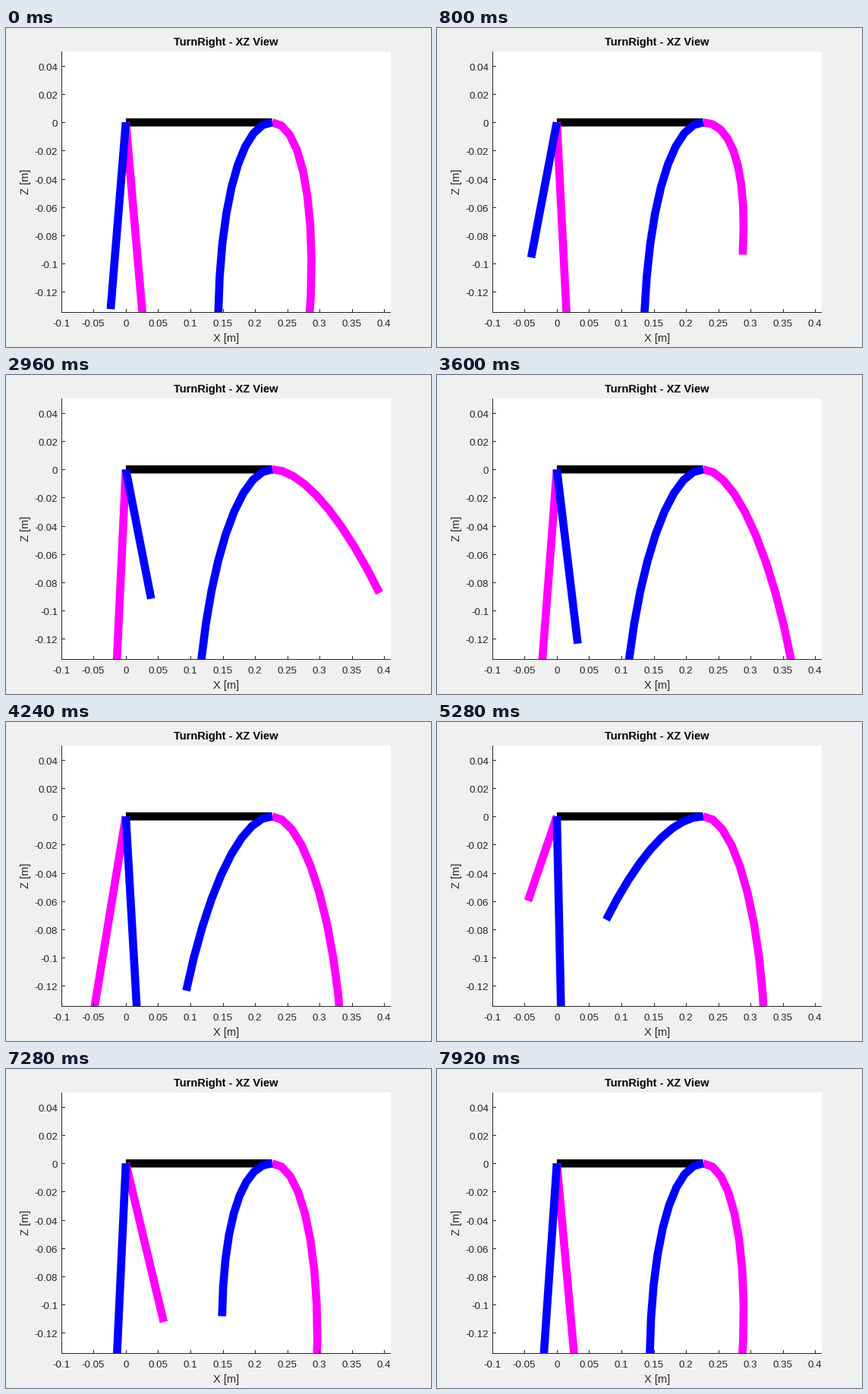
These frames come from a looping animation (560 px wide and 420 px high, 8 s). A matplotlib script:

```python
import numpy as np
import matplotlib.pyplot as plt
from matplotlib.animation import FuncAnimation
from matplotlib.lines import Line2D

W, H, DPI = 560, 420, 100
FRAMES, INTERVAL = 100, 80
HALF = FRAMES // 2
PT = 72 / DPI                      # points per pixel

INK = "#262626"
MAGENTA, BLUE = "#ff00ff", "#0000ff"
LINE_PX = 10.67

LEFT, RIGHT, TOP, BOTTOM = 72.8, 506.8, 31.4, 374.4   # plot box in pixels
X_MIN, X_MAX, Z_MAX = -0.1, 0.41, 0.05

FRONT_X = 0.2264
HIP_DEPTH = 0.1                    # centre of the foot circle below the hip
LIMB = 0.242                       # limb length
AXIAL, LATERAL = 0.555, np.sqrt(3) / 2
SEGMENTS = 9
FLOOR = HIP_DEPTH + 0.04 * np.sin(np.pi / 3)

plt.rcParams["font.family"] = "Liberation Sans"

# lookup from sideways reach to bending angle of a circular arc
BEND = np.linspace(1e-4, 2.2, 4000)
REACH = LIMB * (1 - np.cos(BEND)) / BEND


def foot(step, radius, kick):
    """Lateral offset and depth: 300 degree swing, then a straight stance."""
    step %= FRAMES
    if step >= HALF:
        u = (step - HALF) / HALF
        return radius * (0.5 - u), HIP_DEPTH + radius * np.sin(np.pi / 3)
    angle = np.radians(240 - 300 * step / HALF)
    c, s = np.cos(angle), np.sin(angle)
    lift = kick * max(c, 0) * max(s, 0)      # extra rise while reaching forward
    return radius * c, HIP_DEPTH - radius * s - lift


def limb(hip_x, axial, lateral, step, radius, kick):
    """Side view of a constant curvature limb."""
    side, depth = foot(step, radius, kick)
    reach = np.hypot(side, depth)
    bend = np.interp(reach, REACH, BEND)
    arc = np.linspace(0, bend, SEGMENTS + 1)
    curve = LIMB / bend
    out = curve * np.sin(arc)
    off = curve * (1 - np.cos(arc)) / reach
    return hip_x + axial * out + lateral * side * off, -depth * off


# hip x, axial and lateral share of x, step offset, foot radius, kick, colour
LIMBS = [
    (0, 0, 1, 1 + HALF, 0.06, 0, MAGENTA),
    (FRONT_X, AXIAL, LATERAL, 1, 0.06, 0, MAGENTA),
    (0, 0, 1, 1, 0.04, 0, BLUE),
    (FRONT_X, -AXIAL, LATERAL, 1 + HALF, 0.04, 0.0158, BLUE),
]

fig = plt.figure(figsize=(W / DPI, H / DPI), dpi=DPI, facecolor="#f0f0f0")
ax = fig.add_axes([LEFT / W, 1 - BOTTOM / H,
                   (RIGHT - LEFT) / W, (BOTTOM - TOP) / H], facecolor="white")
ax.set_xlim(X_MIN, X_MAX)
ax.set_ylim(-FLOOR, Z_MAX)


def label(x, y, text, px, ha="center", color=INK, **kw):
    fig.text(x / W, 1 - y / H, text, fontsize=px * PT, ha=ha, va="baseline",
             color=color, **kw)


def rule(x0, y0, x1, y1):
    """One pixel line given in stage pixels."""
    fig.add_artist(Line2D([x0 / W, x1 / W], [1 - y0 / H, 1 - y1 / H],
                          color=INK, lw=PT, snap=False,
                          solid_capstyle="butt"))


def draw_axes():
    ax.spines[:].set_visible(False)
    ax.set_xticks([])
    ax.set_yticks([])
    left, bottom = round(LEFT) + 0.5, round(BOTTOM) + 0.5
    rule(left, round(TOP), left, bottom + 0.5)
    rule(left - 0.5, bottom, round(RIGHT), bottom)
    for x in np.arange(-2, 9) * 0.05:
        px = round(LEFT + (x - X_MIN) / (X_MAX - X_MIN) * (RIGHT - LEFT))
        rule(px + 0.5, bottom, px + 0.5, bottom - 4.5)
        label(px, 393, f"{x:.2g}", 13.33)
    for z in np.arange(-6, 3) * 0.02:
        py = round(TOP + (Z_MAX - z) / (Z_MAX + FLOOR) * (BOTTOM - TOP))
        rule(left, py + 0.5, left + 4.5, py + 0.5)
        label(68, py + 6, f"{z:.2g}", 13.33, ha="right")
    label(289.5, 23.5, "TurnRight - XZ View", 14.67, color="black",
          weight="bold")
    label(290, 413, "X [m]", 14.67)
    label(30, 202, "Z [m]", 14.67, rotation=90, rotation_mode="anchor")


def thick_line(color):
    return ax.plot([], [], color=color, lw=LINE_PX * PT, snap=False,
                   solid_capstyle="butt", solid_joinstyle="miter")[0]


draw_axes()
thick_line("black").set_data([0, FRONT_X], [0, 0])
lines = [thick_line(spec[-1]) for spec in LIMBS]


def update(i):
    for line, spec in zip(lines, LIMBS):
        hip, axial, lateral, offset, radius, kick, _ = spec
        line.set_data(*limb(hip, axial, lateral, i + offset, radius, kick))
    return lines


anim = FuncAnimation(fig, update, frames=FRAMES, interval=INTERVAL,
                     repeat=True, repeat_delay=0, blit=False)
plt.show()
```
